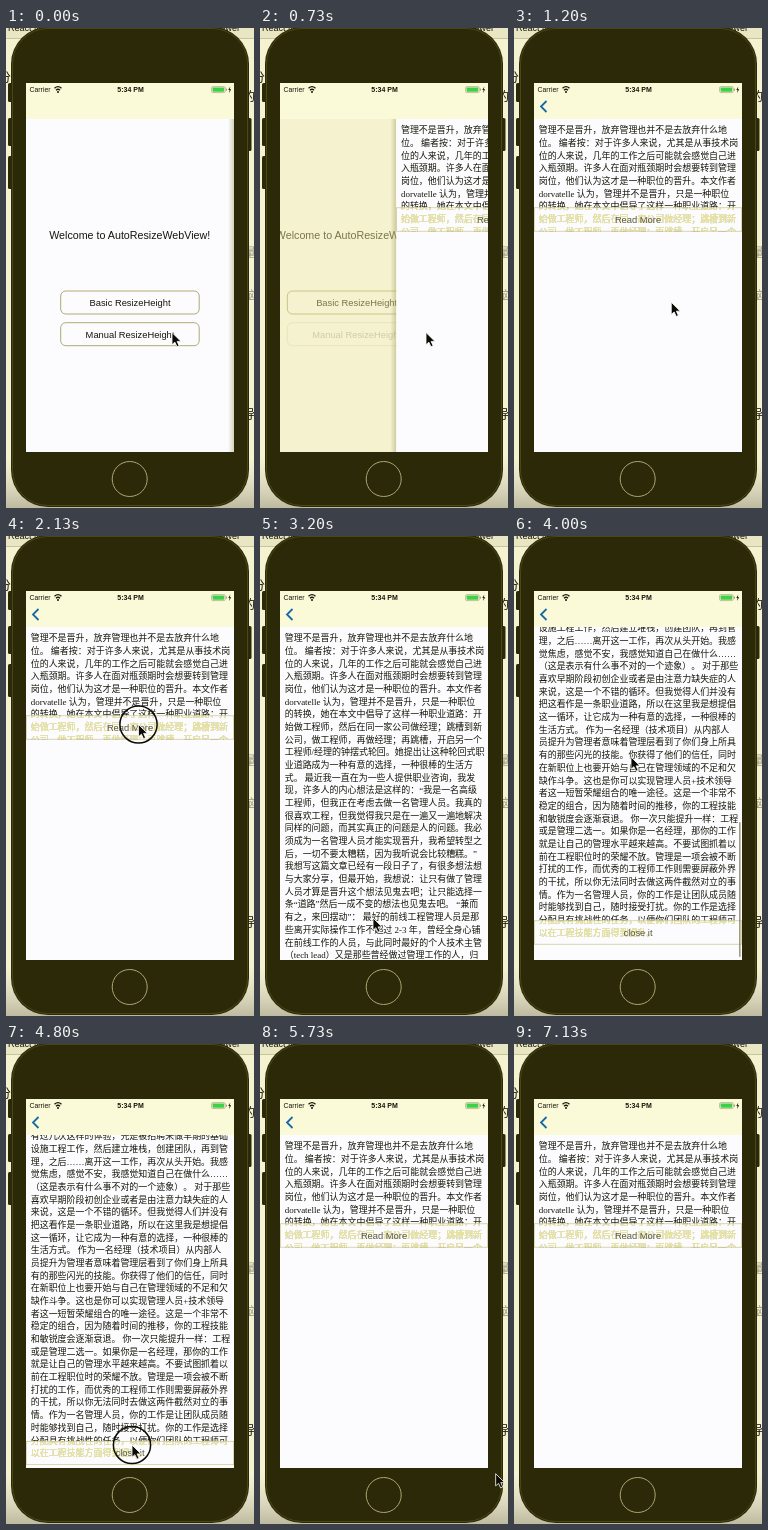
These frames come from a looping animation (248 px wide and 480 px high, 7190 ms). An HTML page:

```html
<!DOCTYPE html>
<html lang="zh">
<head>
<meta charset="utf-8">
<title>AutoResizeWebView</title>
<style>
html, body { margin: 0; width: 100%; height: 100%; overflow: hidden; background: #f3f0d0; }
svg { display: block; width: 100%; height: 100%; }
text { font-family: "Liberation Sans", Arial, sans-serif; fill: #17160a; white-space: pre; }
.mid { text-anchor: middle; font-size: 9.35px; }
.status { font-size: 6.9px; }
.article text, .behind text {
  font: 8.97px "Liberation Serif", "Noto Sans CJK SC", "Noto Sans CJK", sans-serif;
  text-spacing-trim: space-all;
}
.behind text { font-size: 12px; }
.outline { fill: #fcfcfe; stroke: #9a9650; stroke-width: .8; }
.fade { mix-blend-mode: lighten; fill: #e6e2a4; }
</style>
</head>
<body>
<svg viewBox="0 0 248 480">
  <defs>
    <clipPath id="screen"><rect x="20" y="55" width="208" height="369"/></clipPath>
    <clipPath id="body"><rect x="20" y="91" width="208" height="333"/></clipPath>
    <clipPath id="web"><rect id="webClip" x="20" y="91" width="208"/></clipPath>
    <linearGradient id="edge"><stop stop-color="#8a8640" stop-opacity="0"/><stop offset="1" stop-color="#8a8640" stop-opacity=".35"/></linearGradient>
    <linearGradient id="floor" x2="0" y2="1"><stop stop-color="#d6d4c0" stop-opacity="0"/><stop offset="1" stop-color="#bdbaa0"/></linearGradient>
  </defs>

  <rect width="248" height="480" fill="#f5f2d2"/>
  <rect width="248" height="10" fill="#e9e6c4"/>
  <path d="M0 10.5H248" stroke="#c9c59a"/>
  <g class="behind">
    <text x="2" y="3" style="font:9px 'Liberation Sans',sans-serif">React Native</text>
    <text x="208" y="3" style="font:9px 'Liberation Sans',sans-serif">viewer</text>
    <text x="-7" y="54">分</text><text x="237" y="73">的</text>
    <text x="237" y="391">导</text>
    <text x="238" y="229" opacity=".4">量</text><text x="238" y="272" opacity=".4">脑</text>
  </g>
  <rect y="430" width="248" height="50" fill="url(#floor)"/>

  <g fill="#2c2908">
    <rect x="2" y="55" width="6" height="19" rx="1.5"/>
    <rect x="2" y="90" width="6" height="28" rx="1.5"/>
    <rect x="2" y="128" width="6" height="33" rx="1.5"/>
    <rect x="240" y="90" width="5.5" height="33" rx="1.5"/>
    <rect x="5" y="-1" width="238" height="480" rx="37"/>
  </g>
  <rect x="6.5" y=".5" width="235" height="477" rx="35.5" fill="none" stroke="#4a4616"/>
  <circle cx="123.7" cy="451" r="17.5" fill="#2c2908" stroke="#aaa673" stroke-width="1"/>

  <g clip-path="url(#screen)">
    <rect x="20" y="55" width="208" height="369" fill="#fcfcfe"/>
    <g clip-path="url(#body)">
      <g id="home">
        <rect x="20" y="91" width="208" height="333" fill="#fcfcfe"/>
        <text x="123.7" y="211" class="mid" style="font-size:10.7px">Welcome to AutoResizeWebView!</text>
        <rect class="outline" x="54.7" y="263" width="138.5" height="23" rx="5"/>
        <text x="124" y="278" class="mid">Basic ResizeHeight</text>
        <g id="manual">
          <rect class="outline" x="54.7" y="294.7" width="138.5" height="23" rx="5"/>
          <text x="124" y="309.7" class="mid">Manual ResizeHeight</text>
        </g>
      </g>
      <rect id="dim" x="20" y="91" width="208" height="333" fill="#ece69a"/>
      <g id="detail">
        <rect x="14" y="91" width="6" height="333" fill="url(#edge)"/>
        <rect x="20" y="91" width="208" height="333" fill="#fcfcfe"/>
        <g clip-path="url(#web)" style="isolation:isolate">
          <rect x="20" y="91" width="208" height="333" fill="#fcfcfe"/>
          <g id="article" class="article"></g>
          <rect id="fade" class="fade" x="20" width="208" height="24"/>
        </g>
        <g id="toggle">
          <rect x="20.3" y=".3" width="207.4" height="23.4" fill="none" stroke="#c9c58a" stroke-width=".7"/>
          <text id="label" x="124" y="15" class="mid" style="fill:#5c5a44"></text>
        </g>
        <rect id="bar" x="225" width="1.6" rx=".8" fill="#77734a"/>
      </g>
    </g>

    <rect x="20" y="55" width="208" height="36" fill="#fbfad8"/>
    <path id="back" d="M32.5 73L27 78.5L32.5 84" fill="none" stroke="#1769a8" stroke-width="1.8"/>
    <text x="23.5" y="64" class="status">Carrier</text>
    <g fill="none" stroke="#17160a" stroke-width="1.3">
      <path d="M48.5 60.2Q52 57 55.5 60.2M50 62.2Q52 60.3 54 62.2"/>
    </g>
    <circle cx="52" cy="64" r="1" fill="#17160a"/>
    <text x="124.5" y="64" class="mid" style="font-size:7px;font-weight:bold">5:34 PM</text>
    <rect x="205.6" y="58.6" width="13.6" height="6" rx="1.4" fill="none" stroke="#9a9770" stroke-width=".6"/>
    <rect x="206.6" y="59.5" width="11.6" height="4.2" rx=".7" fill="#3fd04a"/>
    <rect x="219.9" y="60.6" width="1" height="2" fill="#9a9770"/>
    <path d="M224.3 58.5L222.3 62H223.6L223 65L225.2 61.2H223.8Z" fill="#17160a"/>
  </g>

  <g id="cursor">
    <circle id="press" r="18.6" fill="none" stroke="#0c0b04" stroke-width="1.5"/>
    <path d="M0 0V12.2L2.9 9.7L5 14.2L7.1 13.2L5.1 8.9H9Z" fill="#0c0b04" stroke="#fff" stroke-width=".8"/>
  </g>
</svg>
<script>
const LOOP = 7190, LINE = 12.68, FIRST = 102, BOX = 24, VIEW_END = 421;
const lines = `管理不是晋升，放弃管理也并不是去放弃什么地
位。 编者按：对于许多人来说，尤其是从事技术岗
位的人来说，几年的工作之后可能就会感觉自己进
入瓶颈期。许多人在面对瓶颈期时会想要转到管理
岗位，他们认为这才是一种职位的晋升。本文作者
dorvatelle 认为，管理并不是晋升，只是一种职位
的转换，她在本文中倡导了这样一种职业道路：开
始做工程师，然后在同一家公司做经理；跳槽到新
公司，做工程师，再做经理；再跳槽，开启另一个
工程师/经理的钟摆式轮回。她提出让这种轮回式职
业道路成为一种有意的选择，一种很棒的生活方
式。 最近我一直在为一些人提供职业咨询，我发
现，许多人的内心想法是这样的：“我是一名高级
工程师，但我正在考虑去做一名管理人员。我真的
很喜欢工程，但我觉得我只是在一遍又一遍地解决
同样的问题，而其实真正的问题是人的问题。我必
须成为一名管理人员才能实现晋升，我希望转型之
后，一切不要太糟糕，因为我听说会比较糟糕。”
我想写这篇文章已经有一段日子了，有很多想法想
与大家分享，但最开始，我想说：让只有做了管理
人员才算是晋升这个想法见鬼去吧；让只能选择一
条“道路”然后一成不变的想法也见鬼去吧。 “兼而
有之，来回摆动”： 最好的前线工程管理人员是那
些离开实际操作工作不超过 2-3 年，曾经全身心铺
在前线工作的人员，与此同时最好的个人技术主管
（tech lead）又是那些曾经做过管理工作的人，归
根结底，他们既懂得技术，也懂得如何与人相处。
最好的技术领导者往往是两者兼备的人，他们在两
种角色之间来回转换，每一次转换都会有新的收获
和新的理解。做过管理的工程师更清楚业务目标，
也更明白怎样让团队朝着同一个方向努力。而做过
工程师的经理则能够赢得团队的信任，因为他们知
道问题的难处在哪里。这样的经历并不会浪费时间，
反而会让你变得更加全面。当然，每个人的情况都
不一样，有的人会喜欢长期做管理，有的人则更愿
意一直写代码，这些都是很好的选择。重要的是你
要知道自己为什么做出这样的选择，并且随时可以
改变主意。在过去的这些年里，我自己也曾经多次
有过几次这样的体验，先是被招聘来做早期的基础
设施工程工作，然后建立堆栈，创建团队，再到管
理，之后……离开这一工作，再次从头开始。我感
觉焦虑，感觉不安，我感觉知道自己在做什么……
（这是表示有什么事不对的一个迹象）。 对于那些
喜欢早期阶段初创企业或者是由注意力缺失症的人
来说，这是一个不错的循环。但我觉得人们并没有
把这看作是一条职业道路，所以在这里我是想提倡
这一循环，让它成为一种有意的选择，一种很棒的
生活方式。 作为一名经理（技术项目）从内部人
员提升为管理者意味着管理层看到了你们身上所具
有的那些闪光的技能。你获得了他们的信任，同时
在新职位上也要开始与自己在管理领域的不足和欠
缺作斗争。这也是你可以实现管理人员+技术领导
者这一短暂荣耀组合的唯一途径。这是一个非常不
稳定的组合，因为随着时间的推移，你的工程技能
和敏锐度会逐渐衰退。 你一次只能提升一样：工程
或是管理二选一。如果你是一名经理，那你的工作
就是让自己的管理水平越来越高。不要试图抓着以
前在工程职位时的荣耀不放。管理是一项会被不断
打扰的工作，而优秀的工程师工作则需要屏蔽外界
的干扰，所以你无法同时去做这两件截然对立的事
情。作为一名管理人员，你的工作是让团队成员随
时能够找到自己，随时接受打扰。你的工作是选择
分配具有挑战性的任务，以便你们团队的工程师可
以在工程技能方面得到提升。`.split("\n");

const $ = id => document.getElementById(id);
const set = (id, attrs) => { for (const k in attrs) $(id).setAttribute(k, attrs[k]); };
const clamp = v => Math.max(0, Math.min(1, v));
const smooth = v => v * v * (3 - 2 * v);
const ramp = (t, from, to) => clamp((t - from) / (to - from));
const within = (t, spans) => spans.some(([a, b]) => t >= a && t < b);

$("article").innerHTML = lines.map((s, i) =>
  `<text x="24.7" y="${(FIRST + 3.2 + LINE * i).toFixed(2)}">${s}</text>`).join("");

// Eased interpolation through [time, ...values] keys.
function follow(keys, t) {
  let i = keys.findIndex(k => k[0] > t);
  if (i < 0) return keys[keys.length - 1].slice(1);
  if (i === 0) return keys[0].slice(1);
  const a = keys[i - 1], b = keys[i], p = smooth(ramp(t, a[0], b[0]));
  return a.slice(1).map((v, n) => v + (b[n + 1] - v) * p);
}

const SHORT = 203.5;
const FULL = FIRST + LINE * (lines.length - 1) + 12;
const MAX_SCROLL = FULL - VIEW_END;
const pointer = [
  [900, 166, 304.5], [1800, 132.5, 188.5], [2700, 132.5, 188.5], [3100, 113, 382],
  [3250, 113, 382], [3600, 117, 221], [4050, 117, 221], [4600, 126, 401],
  [5300, 126, 401], [5950, 275, 440]
];
const scrolling = [
  [3250, 0], [3600, 161], [3880, MAX_SCROLL + 20], [4000, MAX_SCROLL + 12.5],
  [4350, MAX_SCROLL]
];
const presses = [[350, 560], [2050, 2250], [3250, 3600], [4720, 4920]];

function draw(t) {
  const push = 1 - (1 - ramp(t, 610, 1110)) ** 2.1;
  set("home", { transform: `translate(${-62 * push} 0)` });
  set("manual", { opacity: within(t, [[350, 1200]]) ? .3 : 1 });
  set("dim", { opacity: Math.min(1, push * 1.05) });
  set("detail", { transform: `translate(${208 * (1 - push)} 0)` });
  set("back", { opacity: clamp(push * 2 - 1) });

  const open = smooth(ramp(t, 2250, 2550)) - smooth(ramp(t, 4950, 5250));
  const bottom = SHORT + (FULL - SHORT) * open;
  let scroll = follow(scrolling, t)[0];
  if (t > 4900) scroll = Math.min(scroll, Math.max(0, bottom - VIEW_END));
  const end = bottom - scroll;
  set("article", { transform: `translate(0 ${-scroll})` });
  set("webClip", { height: Math.max(0, end - 91) });
  set("fade", { y: end - BOX });
  set("toggle", { transform: `translate(0 ${end - BOX})` });
  $("label").textContent = within(t, [[2250, 4950]]) ? "close it" : "Read More";

  const view = 333, size = view * view / (FULL - 91);
  const y = Math.min(94 + (view - size - 6) * scroll / MAX_SCROLL, 421 - size);
  set("bar", { y, height: size, opacity: .7 * (ramp(t, 3250, 3320) - ramp(t, 4350, 4600)) });

  const [px, py] = follow(pointer, t);
  set("cursor", { transform: `translate(${px} ${py})` });
  set("press", { opacity: within(t, presses) ? 1 : 0 });
}

const start = performance.now();
function tick() {
  draw((performance.now() - start) % LOOP);
  requestAnimationFrame(tick);
}
tick();
</script>
</body>
</html>
```
